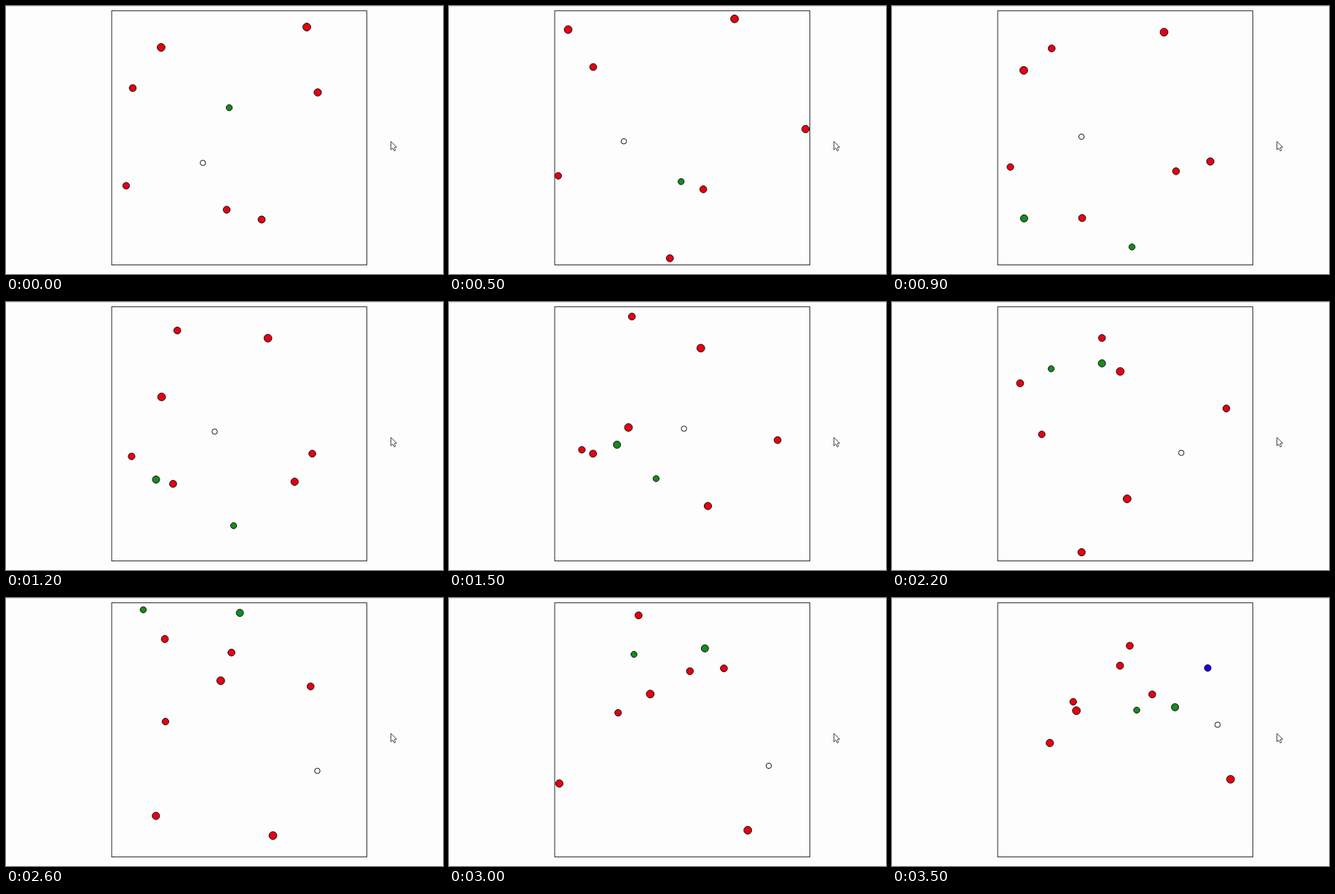
An HTML page with a canvas that plays this animation: 600 by 369 pixels, repeating every 3.6 s.

```html
<!DOCTYPE html>
<html lang="en">
<head>
<meta charset="utf-8">
<title>Bouncing balls</title>
<style>
html, body { margin: 0; width: 100%; height: 100%; overflow: hidden; background: #fefdfe; }
canvas { display: block; }
</style>
</head>
<body>
<canvas id="stage" width="600" height="369"></canvas>
<script>
const ctx = document.getElementById('stage').getContext('2d');
const LOOP = 3600, STEP = 100;
const WALL = { x: [144.6, 496], y: [7.2, 357.3] };
const RED = '#e60012', GREEN = '#178a1e', BLUE = '#1a00d8';

// Every ball runs straight and rebounds; "turns" are new velocities taken at walls
const ball = (color, r, x, y, vx, vy, born = 0, turns = []) =>
  ({ color, r, x, y, vx, vy, born, turns });

const balls = [
  ball(RED, 5.8, 213, 57, -10.92, -14.03),
  ball(RED, 5.8, 413, 29, -4.63, -4.58),
  ball(RED, 5.2, 174, 113, 5.31, -6.4),
  ball(RED, 5.5, 428, 119, 13.6, 11.15),
  ball(RED, 5, 165, 247.5, -3.32, -3.03),
  ball(RED, 5.2, 303, 280.5, 10.2, -6.22),
  ball(RED, 5.3, 351, 294, -10.55, 13.85),
  ball(GREEN, 4.6, 306.5, 140, 2.7, 22.5, 0, [[-9.4, -21.6], [16.4, 15.35]]),
  ball(GREEN, 5.4, 156.7, 340.5, 8.22, -16, 6, [[7.46, 16.2]]),
  ball(BLUE, 5, 469.5, 43, -12, 17.8, 32)
];

// Where the player is steered: frame, x, y
const player = [
  [0, 270.3, 216], [5, 240, 186.3], [12, 286.5, 178.5], [18, 360, 177.8],
  [26, 427.5, 238], [30, 439, 231], [35, 447, 174.5]
];

// The run starts a little slower during the first five ticks
const clock = frame => frame - Math.min(frame, 5) * 0.095;

// Time until a coordinate reaches the wall it is heading for
function timeToWall(pos, v, r, [lo, hi]) {
  return ((v > 0 ? hi - r : lo + r) - pos) / v;
}

function locate(b, time) {
  let { x, y, vx, vy, r } = b, turn = 0;
  while (true) {
    const tx = timeToWall(x, vx, r, WALL.x);
    const ty = timeToWall(y, vy, r, WALL.y);
    const dt = Math.min(tx, ty, time);
    x += vx * dt;
    y += vy * dt;
    time -= dt;
    if (time <= 0) return [x, y];
    if (turn < b.turns.length) [vx, vy] = b.turns[turn++];
    else if (tx < ty) vx = -vx;
    else vy = -vy;
  }
}

// Smooth curve through the key points
function curve(path, t) {
  let i = 0;
  while (i < path.length - 2 && t > path[i + 1][0]) i++;
  const a = path[i], b = path[i + 1];
  const h = b[0] - a[0], u = (t - a[0]) / h;
  const slope = (k, d) => {
    const p = path[Math.max(k - 1, 0)], q = path[Math.min(k + 1, path.length - 1)];
    return (q[d] - p[d]) / (q[0] - p[0]);
  };
  return [1, 2].map(d =>
    a[d] * (1 + 2 * u) * (1 - u) ** 2 + slope(i, d) * h * u * (1 - u) ** 2 +
    b[d] * u * u * (3 - 2 * u) + slope(i + 1, d) * h * u * u * (u - 1));
}

function disc([x, y], r, color) {
  ctx.beginPath();
  ctx.arc(x, y, r - 0.4, 0, Math.PI * 2);
  ctx.fillStyle = color;
  ctx.fill();
  ctx.stroke();
}

function pointer() {
  ctx.fillStyle = '#fff';
  ctx.strokeStyle = '#333';
  ctx.lineWidth = 0.9;
  const arrow = new Path2D('M528.5 186.5V198l2.5-2.4 2 3.9 1.9-.9-1.9-3.7 3.3-.5z');
  ctx.fill(arrow);
  ctx.stroke(arrow);
}

function draw(frame) {
  ctx.fillStyle = '#fefdfe';
  ctx.fillRect(0, 0, 600, 369);
  ctx.fillStyle = '#e2e2e4';
  ctx.fillRect(0, 0, 600, 1);

  ctx.lineWidth = 1;
  ctx.strokeStyle = '#2a2a2a';
  ctx.strokeRect(145.1, 6.6, 350.3, 349.9);

  ctx.strokeStyle = '#111';
  for (const b of balls) {
    if (frame >= b.born) disc(locate(b, clock(frame) - clock(b.born)), b.r, b.color);
  }
  disc(curve(player, frame), 4.1, '#fff');
  pointer();
}

function tick(now) {
  draw(Math.floor((now % LOOP) / STEP));
  requestAnimationFrame(tick);
}

draw(0);
requestAnimationFrame(tick);
</script>
</body>
</html>
```
